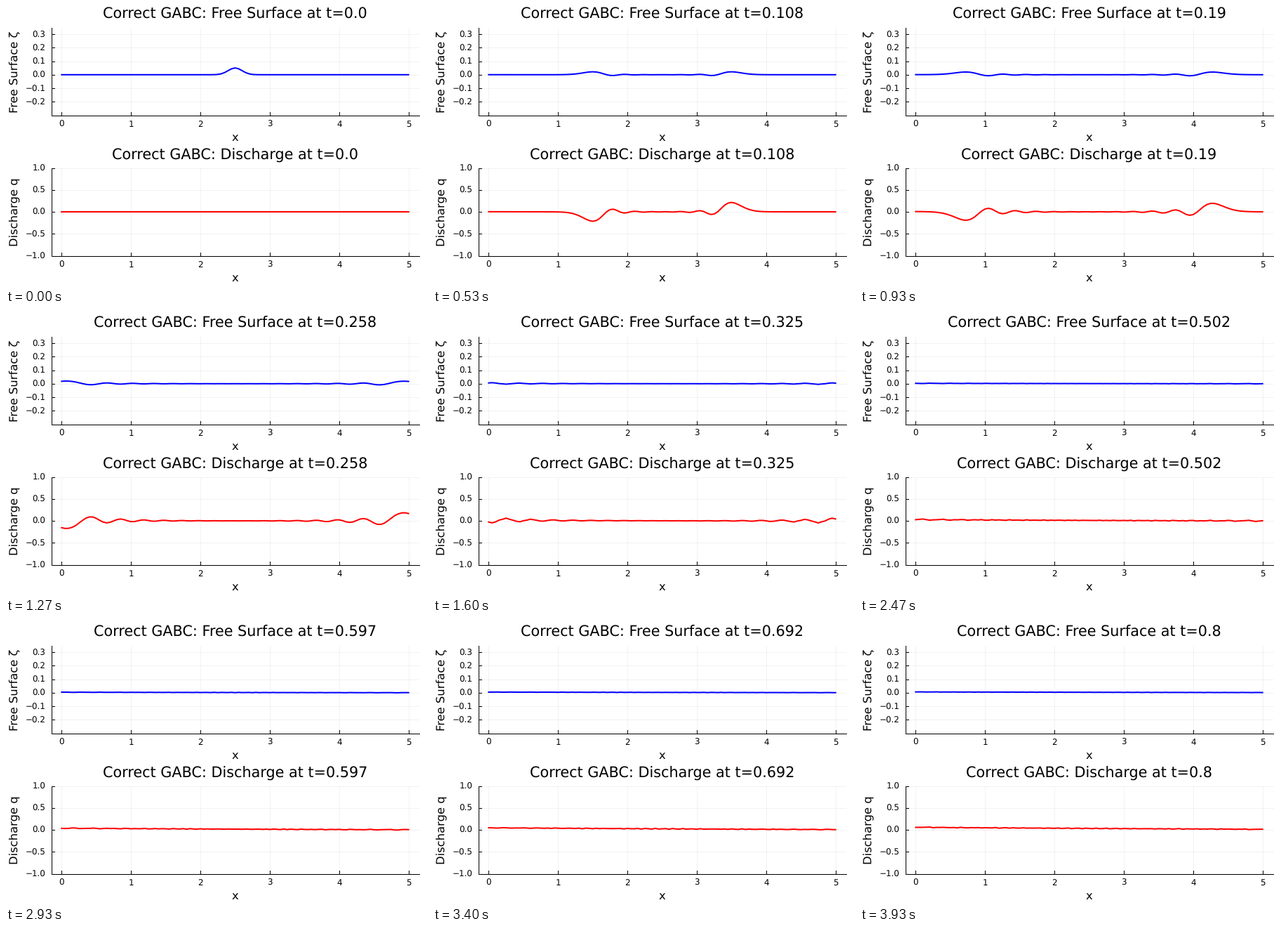
Write a matplotlib script that moves like this. It is 600 px wide and 400 px high and loops after 3990 ms.

```python
import matplotlib.pyplot as plt
import numpy as np
from matplotlib.animation import FuncAnimation
from matplotlib.collections import LineCollection

W, H, DPI = 600, 400, 100
LOOP_MS, TICK_MS, FPS = 3990, 10, 15
STEPS, T_END = 60, 0.8
LENGTH, NODES = 5.0, 101
SPEED = np.sqrt(9.81 * 10)
SUBSTEPS = 12

plt.rcParams.update({"font.family": "DejaVu Sans", "text.hinting": "none"})
PX = 72 / DPI  # points per pixel
LEFT, RIGHT, HEIGHT = 64.5, 588.5, 125
TITLE, GUIDE, TICK = 20.8, 16.35, 11.9

x = np.linspace(0, LENGTH, NODES)
dx = x[1] - x[0]


def inflow(t):
    """Discharge generated at the left boundary."""
    return 0.08 * t ** 1.5


def slope(r):
    """Central differences inside, one-sided at the ends."""
    d = np.empty_like(r)
    d[1:-1] = (r[2:] - r[:-2]) / (2 * dx)
    d[0] = (r[1] - r[0]) / dx
    d[-1] = (r[-1] - r[-2]) / dx
    return d


def rate(right, left):
    dr, dl = -SPEED * slope(right), SPEED * slope(left)
    dr[0] = dl[-1] = 0
    return np.array([dr, dl])


def solve():
    """March both Riemann invariants q +- c*zeta with RK4."""
    bump = 0.05 * np.exp(-50 * (x - LENGTH / 2) ** 2)
    w = SPEED * np.array([bump, -bump])
    dt = T_END / (STEPS - 1) / SUBSTEPS
    states = [w.copy()]
    for n in range(1, (STEPS - 1) * SUBSTEPS + 1):
        k1 = rate(*w)
        k2 = rate(*(w + dt / 2 * k1))
        k3 = rate(*(w + dt / 2 * k2))
        k4 = rate(*(w + dt * k3))
        w = w + dt / 6 * (k1 + 2 * k2 + 2 * k3 + k4)
        w[0, 0], w[1, -1] = 2 * inflow(n * dt), 0
        if n % SUBSTEPS == 0:
            states.append(w.copy())
    right, left = np.array(states).transpose(1, 0, 2)
    return (right - left) / (2 * SPEED), (right + left) / 2


# One axes over the whole stage, measured in pixels from the top left.
fig = plt.figure(figsize=(W / DPI, H / DPI), dpi=DPI, facecolor="white")
stage = fig.add_axes([0, 0, 1, 1])
stage.set(xlim=(0, W), ylim=(H, 0))
stage.axis("off")


def label(px, py, text, size, ha="center", **kw):
    return stage.text(px, py, text, fontsize=size * PX, ha=ha,
                      va="baseline", **kw)


def strokes(segments, width, alpha=1):
    stage.add_collection(LineCollection(
        segments, colors=[(0, 0, 0, alpha)], linewidths=width * PX,
        capstyle="projecting" if alpha == 1 else "butt"))


def to_px(v):
    return LEFT + (v + 0.15) / 5.3 * (RIGHT - LEFT)


class Panel:
    def __init__(self, top, ylim, yticks, ylabel, name, color):
        self.top, self.ylim, self.name = top, ylim, name
        bottom = top + HEIGHT
        cols = [to_px(i) for i in range(6)]
        rows = [self.to_py(v) for v in yticks]

        strokes([[(c, top), (c, bottom)] for c in cols]
                + [[(LEFT, r), (RIGHT, r)] for r in rows], 0.5, 0.1)
        strokes([[(LEFT, top), (LEFT, bottom)],
                 [(LEFT, bottom), (RIGHT, bottom)]], 1)
        strokes([[(c, bottom), (c, bottom - 4.5)] for c in cols]
                + [[(LEFT, r), (LEFT + 4.5, r)] for r in rows], 1)

        for i, c in enumerate(cols):
            label(c, bottom + 16.5, str(i), TICK)
        for v, r in zip(yticks, rows):
            text = f"{v:.1f}".replace("-", "\u2212")
            label(56.5, r + 4.3, text, TICK, ha="right")
        middle = (LEFT + RIGHT) / 2
        label(middle, bottom + 36.5, "x", GUIDE)
        label(17, top + HEIGHT / 2 + 0.5, ylabel, GUIDE,
              rotation=90, rotation_mode="anchor")
        self.title = label(middle, top - 12.3, "", TITLE)
        self.line, = stage.plot(to_px(x), 0 * x, color=color,
                                linewidth=2 * PX)

    def to_py(self, v):
        low, high = self.ylim
        return self.top + (high - v) / (high - low) * HEIGHT

    def show(self, values, t):
        self.line.set_ydata(self.to_py(values))
        self.title.set_text(f"Correct GABC: {self.name} at t={t}")


surface = Panel(30.5, (-0.3, 0.35), [-0.2, -0.1, 0, 0.1, 0.2, 0.3],
                "Free Surface \u03b6", "Free Surface", "blue")
flow = Panel(230.5, (-1, 1), [-1, -0.5, 0, 0.5, 1],
             "Discharge q", "Discharge", "red")
zeta, q = solve()


def draw(n):
    # Steps start at multiples of 1/15 s, rounded to the nearest tick.
    i = int((n + 0.5) * TICK_MS * FPS / 1000)
    t = round(T_END * i / (STEPS - 1), 3)
    surface.show(zeta[i], t)
    flow.show(q[i], t)
    return surface.title, surface.line, flow.title, flow.line


anim = FuncAnimation(fig, draw, frames=LOOP_MS // TICK_MS, interval=TICK_MS,
                     repeat=True, repeat_delay=0, blit=False)
plt.show()
```
